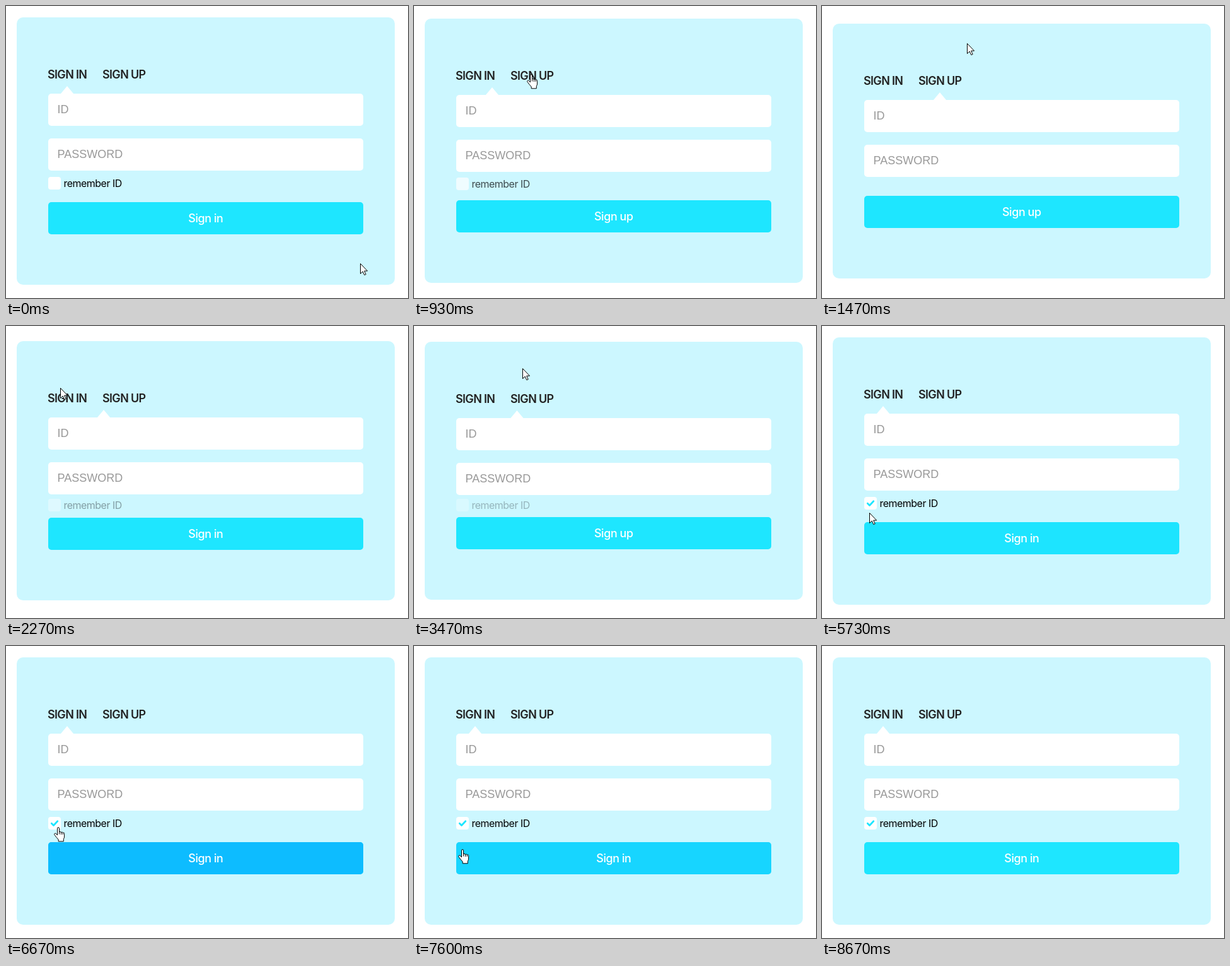
These frames come from a looping animation (638 px wide and 463 px high, 9340 ms). An HTML page:

```html
<!DOCTYPE html>
<html lang="en">
<head>
<meta charset="utf-8">
<title>Sign in form</title>
<style>
html, body { margin: 0; width: 100%; height: 100%; overflow: hidden; background: #fff; }
svg { display: block; width: 638px; height: 463px; }
text { font: 500 18px Inter, sans-serif; letter-spacing: -.025em; fill: #222; }
.tab { font-weight: 600; letter-spacing: -.037em; }
.hint { font: 18px "Liberation Sans", Arial, sans-serif; letter-spacing: 0; fill: #999; }
.label { font-size: 16px; font-weight: 400; letter-spacing: -.032em; fill: #000; }
.action { fill: #fff; text-anchor: middle; }
.cursor path { fill: #fff; stroke: #000; stroke-linejoin: round; }
</style>
</head>
<body>
<svg viewBox="0 0 638 463">
  <rect id="card" x="17" width="600" rx="10" fill="#ccf7ff"/>
  <!-- fields, placed for the sign-in state -->
  <g id="fields">
    <text class="tab" x="66" y="115">SIGN IN</text>
    <text class="tab" x="153" y="115">SIGN UP</text>
    <path id="pointer" d="M-10.5 139.5L0 127L10.5 139.5Z" fill="#fff"/>
    <rect x="67" y="139" width="500" height="51" rx="5" fill="#fff"/>
    <text class="hint" x="81.5" y="170">ID</text>
    <rect x="67" y="210" width="500" height="51" rx="5" fill="#fff"/>
    <text class="hint" x="81.5" y="241">PASSWORD</text>
  </g>
  <g id="remember">
    <rect x="67" width="20" height="20" rx="4" fill="#fff"/>
    <path id="tick" d="M72.3 10.3l3.2 3.2 6.3-6.7" fill="none" stroke="#1ee6ff" stroke-width="2.8" stroke-linecap="round" stroke-linejoin="round"/>
    <text class="label" x="91.4" y="16">remember ID</text>
  </g>
  <g id="button">
    <rect x="67" width="500" height="51" rx="5" fill="#1ee6ff"/>
    <rect id="shade" x="67" width="500" height="51" rx="5" fill="#0dbaff"/>
    <text id="action" class="action" x="316.8" y="32"></text>
  </g>
  <g id="cursor" class="cursor">
    <path id="arrow" d="M.5 .5V16.5L4.2 13L6.8 18.6L9.2 17.6L6.7 12.1H11.6Z"/>
    <g id="hand" transform="translate(-6 0)">
      <path d="M5.5 13V2.2Q5.5 .7 7 .7T8.5 2.2V8.5Q8.8 7.4 10 7.4T11.4 9Q11.8 8 12.9 8T14.2 9.6Q14.6 8.9 15.4 8.9Q16.6 8.9 16.6 10.5V15Q16.6 17.5 15.3 19.2V22.8H7.2V20Q4 16.5 1 12.4Q.2 11 1.4 10.2T4 11.2Z"/>
      <path d="M8.5 8.5V11.5M11.4 9V12M14.2 9.6V12"/>
    </g>
  </g>
</svg>
<script>
const LOOP = 9340, FADE = 500, REST = 150;
const tabClicks = [830, 2158, 3250, 4390];
const hoverFlips = [5700, 6640, 7480, 7830];
const checkTime = 5470;

// where the mouse stops: arrival time, x, y; it rests, then glides on
const stops = [
  [0, 562, 408], [730, 184, 109], [1470, 230, 59], [2270, 86, 98],
  [3000, 172, 108], [3470, 172, 67], [4130, 95, 110], [4730, 27, 129],
  [5270, 74, 276], [6200, 78, 332], [6670, 82, 287], [7270, 75, 277],
  [7650, 76, 328], [8330, 74, 275], [8670, 57, 475]
];

const $ = id => document.getElementById(id);
const move = (id, x, y) => $(id).setAttribute("transform", `translate(${x} ${y})`);
const show = (id, on) => $(id).style.display = on ? "" : "none";

// the standard CSS "ease" curve
function ease(x) {
  if (x >= 1) return 1;
  let lo = 0, hi = 1;
  for (let i = 0; i < 20; i++) {
    const s = (lo + hi) / 2;
    if (.75 * s * (1 - s) + s ** 3 < x) lo = s; else hi = s;
  }
  return .3 * lo * (1 - lo) ** 2 + 3 * (1 - lo) * lo * lo + lo ** 3;
}

// a 0/1 state that flips at the given times, with its eased value
function toggle(times, start, t) {
  const past = times.filter(time => time <= t);
  const on = (start + past.length) % 2;
  if (!past.length) return { on, value: on };
  const k = ease((t - past.at(-1)) / FADE);
  return { on, value: on ? k : 1 - k };
}

function mouse(t) {
  const next = stops.find(stop => stop[0] > t) || stops.at(-1);
  const last = stops[stops.indexOf(next) - 1];
  const leave = last[0] + REST;
  const u = Math.min(1, Math.max(0, (t - leave) / (next[0] - leave)));
  const k = u * u * (3 - 2 * u);
  return [1, 2].map(i => Math.round(last[i] + (next[i] - last[i]) * k));
}

function draw(t) {
  const { on: signIn, value: p } = toggle(tabClicks, 1, t);
  const top = Math.floor(28 - 10 * p), shift = top - 18;
  const buttonY = Math.floor(301 + 10 * p);

  $("card").setAttribute("y", top);
  $("card").setAttribute("height", Math.floor(432 + 10 * p) - top);
  move("fields", 0, shift);
  move("pointer", 187 - 90 * p, 0);
  move("remember", 0, Math.floor(276 - 5 * p));
  $("remember").style.opacity = p;
  show("tick", t >= checkTime);
  move("button", 0, buttonY);
  $("shade").style.opacity = toggle(hoverFlips, 0, t).value;
  $("action").textContent = signIn ? "Sign in" : "Sign up";

  const [x, y] = mouse(t);
  const within = (l, r, a, b) => x >= l && x <= r && y >= a && y <= b;
  const link = within(66, 130, 100 + shift, 121 + shift) ||
    within(153, 222, 100 + shift, 121 + shift) ||
    within(67, 185, 271, 291) || within(67, 567, buttonY, buttonY + 51);
  move("cursor", x, y);
  show("hand", link);
  show("arrow", !link);
}

const begin = performance.now();
function tick() {
  draw((performance.now() - begin) % LOOP);
  requestAnimationFrame(tick);
}
tick();
</script>
</body>
</html>
```
